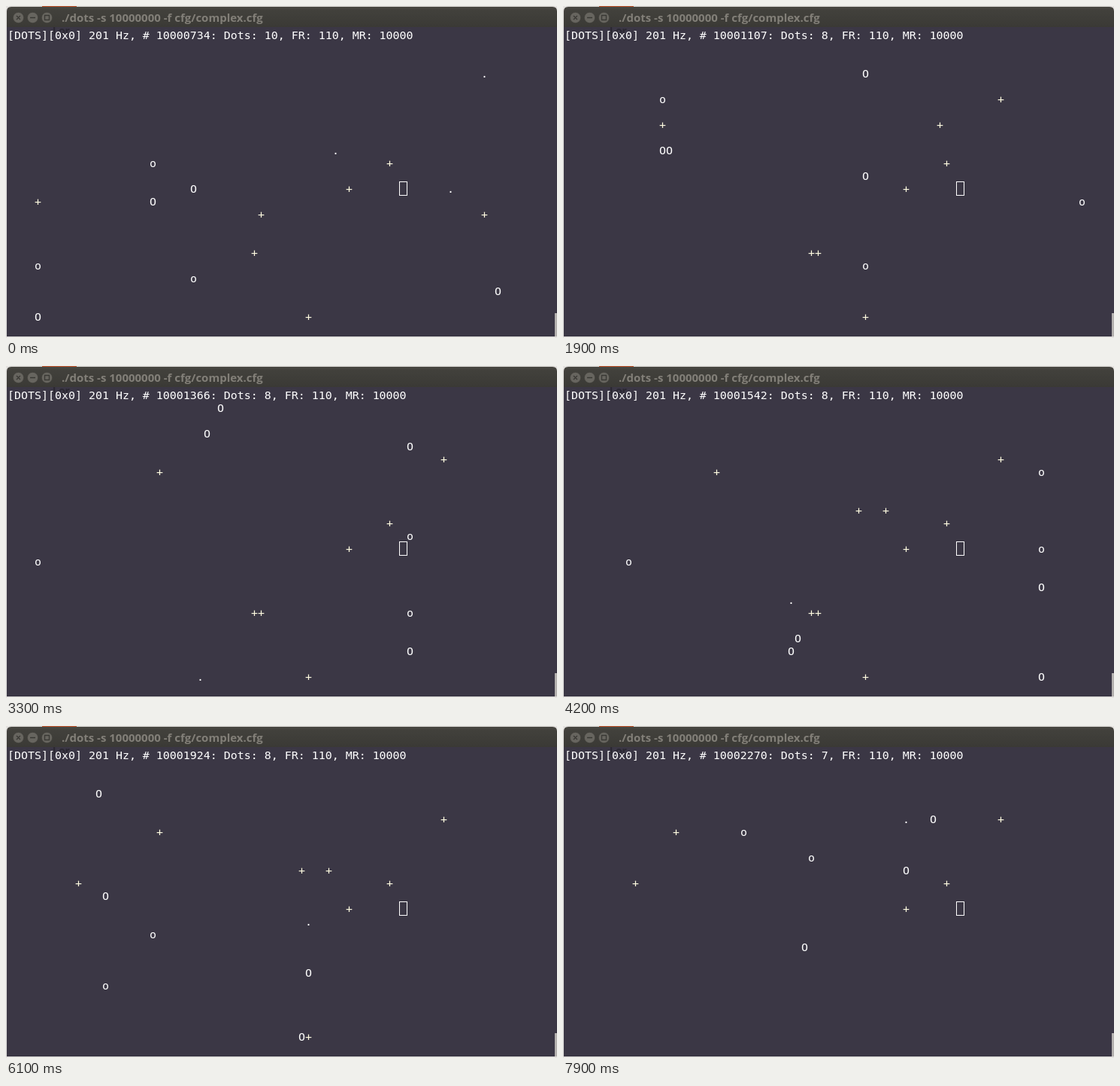
An HTML page that plays this animation: 733x441 px, repeating every 8 s.

```html
<!DOCTYPE html>
<html lang="en">
<head>
<meta charset="utf-8">
<title>Terminal simulation</title>
<style>
  html, body { margin: 0; width: 100%; height: 100%; overflow: hidden; background: #e4e2df; }
  svg { display: block; width: 733px; height: 441px; }
  .term { font: 14.95px "DejaVu Sans Mono", monospace; fill: #fff; }
  .title { font: bold 15px "Open Sans", "Noto Sans", sans-serif; fill: #827f78; }
</style>
</head>
<body>
<svg viewBox="0 0 733 441">
  <defs>
    <linearGradient id="bar" x2="0" y2="1">
      <stop offset="0" stop-color="#4a4943"/>
      <stop offset=".15" stop-color="#42413c"/>
      <stop offset="1" stop-color="#3a3935"/>
    </linearGradient>
    <clipPath id="screen"><rect x="1" y="28" width="732" height="411"/></clipPath>
  </defs>
  <rect x="48" width="46" height="2" fill="#c9592f"/>
  <path d="M1 29V7Q1 1 7 1H727Q733 1 733 7V29Z" fill="url(#bar)"/>
  <g fill="#67655f" stroke="#403f3a" stroke-width=".8">
    <circle cx="16.5" cy="15.5" r="7.2"/>
    <circle cx="35.5" cy="15.5" r="7.2"/>
    <circle cx="54.5" cy="15.5" r="7.2"/>
  </g>
  <path d="M14 13l5 5m0-5l-5 5M32 15.5h7M51.5 12.5h6v6h-6z" fill="none" stroke="#393834" stroke-width="1.3"/>
  <text class="title" x="74" y="21">./dots -s 10000000 -f cfg/complex.cfg</text>
  <rect x="1" y="28" width="732" height="411" fill="#3b3745"/>
  <text x="62" y="38" clip-path="url(#screen)" font-family="Open Sans, sans-serif" font-weight="bold" font-size="14" fill="#2b2832">l or</text>
  <rect x="730" y="408" width="3" height="31" fill="#b4b1af"/>
  <text id="status" class="term" x="2" y="44"></text>
  <g id="cells" class="term"></g>
  <rect x="523.5" y="233.5" width="10" height="18" fill="none" stroke="#fff"/>
</svg>
<script>
const LOOP = 8000, STEP = 100, COLS = 80, ROWS = 23, END = 80;

// A body flies straight between [step, col, row] points and vanishes after the last.
// Columns and rows run on past the edges and are wrapped when drawn.
const body = (glyph, ...points) => ({ glyph, points });
const shiftRows = (points, by) => points.map(([step, col, row]) => [step, col, row + by]);

const sweep = [[0, 27, 12.3], [19, 44, 11], [77, 116, -22]];
const climb = [[0, 21.2, 13], [31, 58.6, -3], [77, 115, -31]];
const swing = [[48, 117, -8], [59, 124, -6], [77, 130, -14]];

const bodies = [
  body('O', ...sweep.slice(0, 2), [73, 111, -20]),
  body('o', ...shiftRows(sweep, 7)),
  body('O', ...climb),
  body('o', ...shiftRows(climb.slice(0, 2), -3), [68, 104, -28]),
  body('O', [0, 72, 19.6], [19, 95.4, 9], [31, 111, 1], ...swing),
  body('O', [12, 87, 12.5], [19, 94, 9], [31, 109, 3], [48, 116, -9], [59, 123, -1], [77, 134, 5]),
  body('.', [0, 70, 3], [10, 84, 8]),
  body('o', [11, 85, 9], [29, 106, 0]),
  body('.', [30, 107, -1], [31, 108, -1], ...shiftRows(swing, -4)),
  body('.', [0, 65, 12], [10, 70, 14]),
  body('o', [11, 71, 13.6], [31, 84, 13], [59, 101, 14], [77, 106, 6]),
  body('O', [0, 4, 22], [8, 14, 8]),
  body('o', [0, 4, 18], [8, 14, 7]),
  body('.', [0, 48, 9], [8, 55, 7])
];

// Wreckage stays in place for a span of steps.
const wreck = (from, to, ...cells) => ({ from, to, cells });
const wrecks = [
  wreck(0, END, [56, 10], [50, 12]),
  wreck(0, 70, [44, 22]),
  wreck(0, 6, [4, 13], [70, 14]),
  wreck(0, 15, [37, 14]),
  wreck(0, 53, [36, 17]),
  wreck(15, 53, [37, 17]),
  wreck(7, END, [64, 5]),
  wreck(9, 26, [14, 7], [55, 7]),
  wreck(26, 70, [22, 6]),
  wreck(40, 68, [43, 9], [47, 9]),
  wreck(57, END, [10, 10]),
  wreck(73, END, [16, 6])
];

const counter = [[0, 734], [11, 954], [19, 1107], [31, 1366], [48, 1699], [59, 1924], [77, 2270]];

const status = document.getElementById('status');
const cells = document.getElementById('cells');
const wrap = (value, size) => ((Math.round(value) % size) + size) % size;

// Linear interpolation through points whose first entry is the step.
function along(points, step) {
  const next = Math.max(1, points.findIndex(p => p[0] >= step));
  const a = points[next - 1], b = points[next];
  const k = (step - a[0]) / (b[0] - a[0]);
  return a.slice(1).map((v, i) => v + (b[i + 1] - v) * k);
}

function cell(glyph, col, row, color = '#fff') {
  if (row < 1) return ''; // covered by the status line
  return `<text x="${2 + col * 9}" y="${44 + row * 17}" fill="${color}">${glyph}</text>`;
}

function draw(step) {
  const count = step < 5 ? 10 : step < 9 ? 9 : step < 71 ? 8 : 7;
  const tick = 10000000 + Math.round(along(counter, step)[0]);
  status.textContent = `[DOTS][0x0] 201 Hz, # ${tick}: Dots: ${count}, FR: 110, MR: 10000`;

  let out = '';
  for (const w of wrecks) {
    if (step < w.from || step >= w.to) continue;
    for (const [col, row] of w.cells) out += cell('+', col, row, '#fffbe0');
  }
  for (const { glyph, points } of bodies) {
    if (step < points[0][0] || step > points[points.length - 1][0]) continue;
    const [col, row] = along(points, step);
    out += cell(glyph, wrap(col, COLS), wrap(row, ROWS));
  }
  cells.innerHTML = out;
}

// The display stalls for two steps after step 24.
const stalled = step => step <= 24 ? step : Math.max(24, step - 2);

const start = performance.now();
let shown = -1;

function frame() {
  const step = stalled(Math.floor(((performance.now() - start) % LOOP) / STEP));
  if (step !== shown) draw(shown = step);
  requestAnimationFrame(frame);
}
frame();
</script>
</body>
</html>
```
